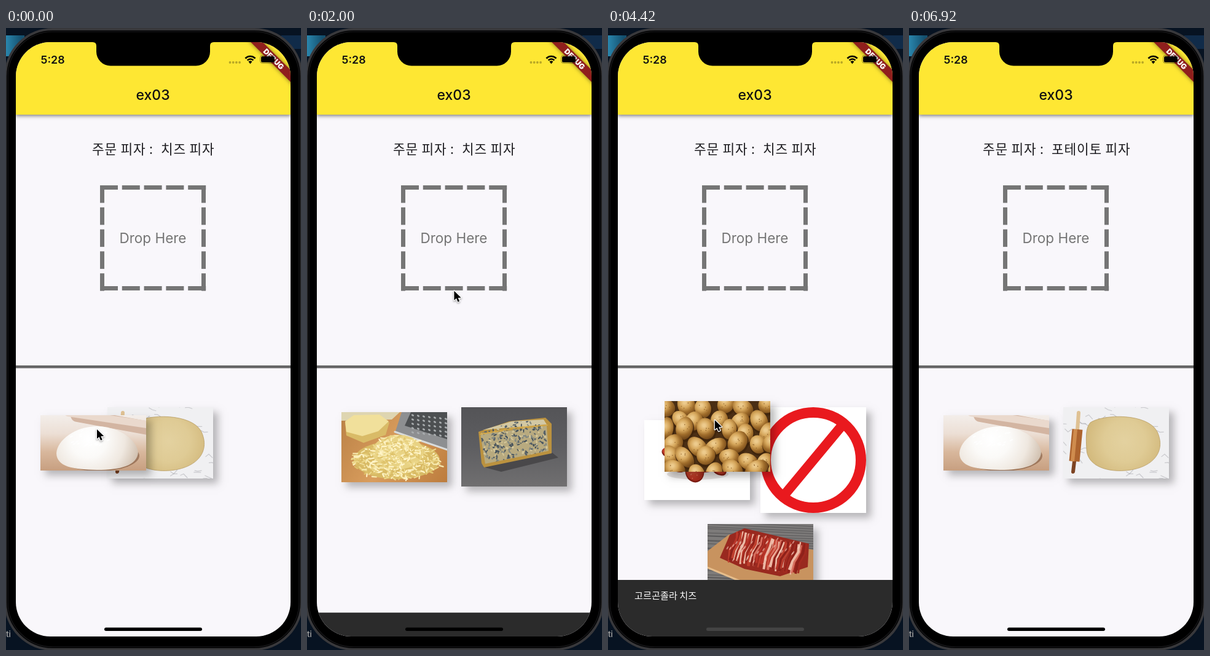
Write an HTML page with a canvas that moves like this. It is 480 px wide and 1012 px high and loops after 7010 ms.

```html
<!DOCTYPE html>
<html lang="ko">
<head>
<meta charset="utf-8">
<title>ex03</title>
<style>
html, body { margin: 0; width: 100%; height: 100%; overflow: hidden; background: #071322; }
canvas { display: block; width: 480px; height: 1012px; }
</style>
</head>
<body>
<canvas id="stage" width="480" height="1012"></canvas>
<script>
const LOOP = 7010, STEP = 1000 / 12, TAU = Math.PI * 2;
const LATIN = 'Inter, "Noto Sans", sans-serif';
const HANGUL = '"Noto Sans CJK KR", "Noto Sans CJK", "Noto Sans", sans-serif';
const ctx = document.getElementById('stage').getContext('2d');

const clamp = v => Math.max(0, Math.min(1, v));
const mix = (a, b, u) => a + (b - a) * u;
const smooth = u => u * u * (3 - 2 * u);

// cubic-bezier(.4, 0, .2, 1)
function fastOutSlowIn(p) {
  let lo = 0, hi = 1, s = 0.5;
  for (let i = 0; i < 18; i++) {
    s = (lo + hi) / 2;
    const x = 1.2 * (1 - s) ** 2 * s + 0.6 * (1 - s) * s * s + s ** 3;
    if (x < p) lo = s; else hi = s;
  }
  return 3 * (1 - s) * s * s + s ** 3;
}

function randomFrom(seed) {
  return () => {
    seed = (seed * 1664525 + 1013904223) >>> 0;
    return seed / 4294967296;
  };
}

// Drawing helpers
function ell(g, fill, x, y, rx, ry = rx, rot = 0) {
  g.fillStyle = fill;
  g.beginPath();
  g.ellipse(x, y, rx, ry, rot, 0, TAU);
  g.fill();
}
function trace(g, pts) {
  g.beginPath();
  for (let i = 0; i < pts.length; i += 2) g.lineTo(pts[i], pts[i + 1]);
}
function poly(g, fill, ...pts) {
  trace(g, pts);
  g.fillStyle = fill;
  g.fill();
}
function line(g, color, width, ...pts) {
  trace(g, pts);
  g.strokeStyle = color;
  g.lineWidth = width;
  g.stroke();
}
function gradient(g, x0, y0, x1, y1, ...colors) {
  const fill = g.createLinearGradient(x0, y0, x1, y1);
  colors.forEach((c, i) => fill.addColorStop(i / (colors.length - 1), c));
  return fill;
}
function glow(g, x, y, r, ...colors) {
  const fill = g.createRadialGradient(x, y, 2, x, y, r);
  colors.forEach((c, i) => fill.addColorStop(i / (colors.length - 1), c));
  return fill;
}
function scatter(rnd, n, x, y, rx, ry, put) {
  for (let i = 0; i < n; i++) {
    const a = rnd() * TAU, r = Math.sqrt(rnd());
    put(x + Math.cos(a) * r * rx, y + Math.sin(a) * r * ry, i);
  }
}
function picture(h, background, seed, paint) {
  const canvas = document.createElement('canvas');
  canvas.width = 172;
  canvas.height = h;
  const g = canvas.getContext('2d');
  g.fillStyle = background;
  g.fillRect(0, 0, 172, h);
  g.lineCap = 'round';
  paint(g, randomFrom(seed));
  return canvas;
}

// Ingredients
const dough = picture(90, '#eee', 3, (g, rnd) => {
  g.fillStyle = gradient(g, 0, 0, 0, 90, '#f3eeea', '#ecdfd5', '#d8b79c', '#c79f80');
  g.fillRect(0, 0, 172, 90);
  line(g, '#d3b5a2', 22, 60, 0, 180, 22);
  line(g, '#ead9cd', 12, 45, -4, 180, 16);
  ell(g, 'rgba(110,70,45,.5)', 95, 66, 66, 25);
  g.beginPath();
  g.moveTo(26, 62);
  g.bezierCurveTo(27, 40, 58, 17, 95, 18);
  g.bezierCurveTo(130, 20, 156, 40, 159, 60);
  g.bezierCurveTo(158, 82, 130, 89, 92, 89);
  g.bezierCurveTo(52, 88, 27, 84, 26, 62);
  g.fillStyle = glow(g, 78, 38, 88, '#fff', '#fbfaf8', '#efe8e0', '#cdbba9');
  g.fill();
  scatter(rnd, 25, 80, 38, 36, 14, (x, y) => ell(g, 'rgba(255,255,255,.7)', x, y, 3, 1.2, -0.4));
});

const flatDough = picture(116, '#f0f0f2', 8, (g, rnd) => {
  scatter(rnd, 60, 86, 58, 110, 75, (x, y) => {
    line(g, 'rgba(120,120,130,.32)', 1.2, x, y, x + 5, y - 5 + rnd() * 10, x + 11, y - 4 + rnd() * 9);
  });
  line(g, '#dfc193', 6, 25, 9, 23, 37);
  line(g, '#7d4322', 6, 18, 88, 16, 105);
  g.lineCap = 'butt';
  line(g, '#ad642f', 17, 23, 36, 18, 88);
  line(g, '#cf8c4e', 6, 20, 36, 15, 88);
  g.beginPath();
  g.moveTo(44, 25);
  g.bezierCurveTo(65, 11, 137, 9, 153, 40);
  g.bezierCurveTo(168, 73, 145, 99, 102, 103);
  g.bezierCurveTo(63, 106, 39, 91, 38, 69);
  g.bezierCurveTo(37, 50, 36, 34, 44, 25);
  g.fillStyle = glow(g, 100, 55, 66, '#e3d19f', '#dfcb95', '#d2b87b');
  g.strokeStyle = '#b89c63';
  g.lineWidth = 0.8;
  g.fill();
  g.stroke();
});

const tomato = picture(112, '#a9a8a8', 5, (g, rnd) => {
  g.fillStyle = gradient(g, 90, 0, 172, 112, '#e4e2e1', '#cfcdcc', '#8b8a8a');
  g.fillRect(0, 0, 172, 112);
  ell(g, '#3c302e', 78, 54, 92, 66);
  ell(g, '#c9c3c1', 78, 46, 92, 65);
  ell(g, '#54231c', 78, 42, 90, 64);
  ell(g, '#b93522', 77, 40, 84, 60);
  const tones = ['#d64e37', '#94271a', '#cb412c', '#e98870', '#a92c1c'];
  scatter(rnd, 520, 77, 40, 82, 58, (x, y, i) =>
    ell(g, tones[i % 5], x, y, 1 + rnd() * 3.5, 0.8 + rnd() * 1.6, rnd() * 3));
  ell(g, '#d8b9a8', 51, 47, 28, 19, -0.45);
  ell(g, '#67352a', 52, 47, 26, 17, -0.45);
  ell(g, '#b9432d', 56, 52, 23, 14, -0.45);
  scatter(rnd, 40, 56, 52, 20, 12, (x, y, i) => ell(g, tones[i % 5], x, y, 2, 1, 0.5));
  line(g, '#512a20', 10, 97, 40, 122, 16, 150, -2);
  line(g, '#8a5441', 3, 96, 38, 121, 14, 148, -3);
});

const cream = picture(97, '#938b87', 6, (g, rnd) => {
  for (let i = 0; i < 120; i++) {
    const x = rnd() * 172, y = rnd() * 97;
    line(g, `rgba(${rnd() < 0.5 ? '70,60,58' : '205,196,190'},.28)`, 1 + rnd() * 2, x, y, x + 40, y - 1);
  }
  line(g, '#4f4846', 2, 0, 37, 172, 36);
  line(g, '#4f4846', 2, 0, 72, 172, 71);
  poly(g, '#e3d8c8', 46, 0, 130, 0, 128, 97, 53, 97);
  for (let i = 0; i < 9; i++) {
    ell(g, i % 2 ? '#d9a82e' : '#b8382a', 52 + i * 9, 4 + i % 3 * 3, 3);
    ell(g, i % 2 ? '#b8382a' : '#d9a82e', 52 + i * 9, 91 - i % 2 * 4, 4);
  }
  line(g, '#5a2b20', 6, 118, 17, 135, 1);
  ell(g, '#5e2418', 87, 48, 49, 47);
  ell(g, '#a4563a', 87, 47, 46, 45);
  ell(g, '#74301f', 87, 48, 42, 42);
  ell(g, glow(g, 80, 60, 55, '#e2d8b9', '#d6caa8', '#b3a37f'), 87, 50, 40, 39);
  line(g, '#bda670', 7, 99, 56, 91, 94);
  line(g, '#e0d0a0', 3, 98, 56, 90, 94);
  poly(g, '#ece2c4', 87, 38, 111, 41, 104, 60, 92, 60);
});

const mozzarella = picture(114, '#cf9654', 9, (g, rnd) => {
  g.fillStyle = gradient(g, 0, 0, 172, 114, '#b98045', '#d99d5d', '#bc7c3d');
  g.fillRect(0, 0, 172, 114);
  poly(g, '#ded5b1', 0, 0, 95, 0, 82, 12, 0, 14);
  poly(g, '#d9bb67', 6, 17, 20, 6, 62, 5, 78, 17, 72, 37, 36, 50, 8, 38);
  poly(g, '#f1e09b', 6, 15, 20, 5, 62, 4, 77, 15, 60, 31, 34, 39, 8, 32);
  poly(g, '#8d8f91', 98, 0, 172, 0, 172, 62, 87, 34);
  poly(g, '#4d5052', 113, 0, 172, 0, 172, 44, 103, 22);
  for (let i = 0; i < 35; i++) {
    ell(g, '#a9adaf', 116 + i % 7 * 9, 5 + Math.floor(i / 7) * 7 + i % 7, 2.3, 1.4, 0.5);
  }
  line(g, '#d9dcdc', 3, 87, 32, 172, 61);
  ell(g, '#d8ba65', 90, 78, 70, 31);
  ell(g, '#e8d283', 92, 65, 42, 28);
  const tones = ['#f7eab0', '#ecd78a', '#fff4c8', '#dfc36c'];
  const strand = (x, y, i) => {
    const a = rnd() * TAU;
    line(g, tones[i % 4], 2.2, x, y, x + Math.cos(a) * 7, y + Math.sin(a) * 4);
  };
  scatter(rnd, 330, 90, 80, 72, 29, strand);
  scatter(rnd, 130, 92, 60, 38, 23, strand);
});

const gorgonzola = picture(129, '#5f5e61', 4, (g, rnd) => {
  g.fillStyle = gradient(g, 0, 0, 0, 129, '#545457', '#5e5e61', '#706f70');
  g.fillRect(0, 0, 172, 129);
  poly(g, '#49484a', 35, 97, 148, 74, 158, 82, 65, 105);
  poly(g, '#bb923f', 28, 40, 78, 23, 137, 17, 147, 27, 147, 75, 37, 98, 33, 91);
  poly(g, '#d3c8a4', 35, 37, 82, 23, 134, 20, 139, 28);
  poly(g, '#b8aa7f', 31, 44, 139, 30, 142, 71, 39, 92);
  g.save();
  trace(g, [31, 42, 82, 24, 134, 21, 142, 71, 39, 92]);
  g.clip();
  const tones = ['#59636a', '#858a81', '#d5c79a', '#46535d'];
  scatter(rnd, 300, 86, 57, 62, 38, (x, y, i) =>
    ell(g, tones[i % 4], x, y, 1 + rnd() * 2.4, 0.8 + rnd(), rnd() * 3));
  g.restore();
  line(g, '#d3a84a', 2, 31, 44, 86, 34, 140, 29);
});

const pepperoni = picture(130, '#fff', 12, (g, rnd) => {
  ell(g, 'rgba(90,60,50,.15)', 87, 88, 50, 9);
  ell(g, '#a12a1a', 88, 62, 46, 24);
  const slices = [58, 43, 80, 35, 101, 42, 122, 50, 44, 53, 68, 53, 90, 54, 111, 61,
    127, 58, 55, 74, 75, 67, 101, 73, 121, 78, 82, 83];
  for (let i = 0; i < slices.length; i += 2) {
    const [x, y] = [slices[i], slices[i + 1]];
    const front = i > 24;
    const rx = front ? 15 : 14 + i % 3, ry = front ? 17 : 9, rot = (i % 5 - 2) * 0.3;
    ell(g, '#7f1c12', x, y + 1.5, rx, ry, rot);
    ell(g, glow(g, x - 3, y - 2, 17, '#d9573c', '#c8402a', '#a82c1c'), x, y, rx - 1, ry - 1, rot);
    scatter(rnd, 9, x, y, rx - 4, ry - 3, (u, v) => ell(g, '#e0745a', u, v, 0.9));
  }
});

const nothing = picture(172, '#fff', 1, g => {
  g.strokeStyle = '#e9191e';
  g.lineWidth = 17;
  g.beginPath();
  g.arc(86, 86, 77.5, 0, TAU);
  g.stroke();
  line(g, '#e9191e', 16, 37, 145, 135, 27);
});

const potato = picture(115, '#4a2e14', 7, (g, rnd) => {
  for (let i = 0; i < 36; i++) {
    const x = (i % 6) * 32 + (Math.floor(i / 6) % 2) * 17 - 4 + rnd() * 14;
    const y = Math.floor(i / 6) * 22 + rnd() * 12;
    const rx = 15 + rnd() * 5, ry = 12 + rnd() * 3, rot = rnd() * 3;
    ell(g, 'rgba(60,34,10,.75)', x + 1, y + 3, rx + 1, ry + 1, rot);
    ell(g, glow(g, x - 3, y - 5, 22, '#edcb8d', '#d6a75c', '#a06d2b', '#74491a'), x, y, rx, ry, rot);
    scatter(rnd, 4, x, y, 9, 8, (u, v) => ell(g, '#94672f', u, v, 0.8));
  }
});

const bacon = picture(97, '#7d7b7a', 11, (g, rnd) => {
  for (let y = -5; y < 97; y += 4) line(g, 'rgba(50,50,53,.35)', 1.5, 0, y + rnd() * 5, 172, y + 9);
  poly(g, '#c8935f', 0, 44, 35, 17, 172, 42, 172, 97, 60, 97, 0, 72);
  line(g, '#e6bd8b', 3, 0, 71, 58, 95, 172, 96);
  poly(g, '#99291f', 20, 55, 36, 18, 60, 7, 165, 32, 163, 70, 118, 85, 60, 73);
  g.lineCap = 'butt';
  const tones = ['#b93529', '#8e211a', '#d8705f', '#c0402f', '#edb8a4', '#a22a20'];
  for (let i = 0; i < 48; i++) {
    const x = 48 + i * 2.4, y = 10 + i * 0.45;
    line(g, tones[Math.floor(rnd() * 6)], 2 + rnd() * 3,
      x, y + rnd() * 6, x - 5 + rnd() * 4, y + 17, x - 10 - rnd() * 3, y + 32,
      x - 17 + rnd() * 4, y + 44 + rnd() * 9);
  }
  scatter(rnd, 45, 92, 44, 62, 24, (x, y) => ell(g, 'rgba(245,205,190,.6)', x, y, 3, 1, -1));
});

const pages = [
  { gap: 23, items: [dough, flatDough] },
  { gap: 23, items: [tomato, cream] },
  { gap: 23, items: [mozzarella, gorgonzola] },
  { gap: 17, items: [pepperoni, nothing, potato, bacon] }
];

// Schedule, in ms
const drags = [
  { start: 0, end: 540, page: 0, item: 0, dx: 92, dy: 23 },
  { start: 1060, end: 1640, page: 1, item: 0, dx: 134, dy: 8 },
  { start: 2450, end: 2940, page: 2, item: 1, dx: 35, dy: 11 },
  { start: 4050, end: 4980, page: 3, item: 2, dx: 82, dy: 31 }
];
const snacks = [
  { text: '오리지널 도우', enter: 560, leave: 1830 },
  { text: '토마토 소스', enter: 2075, leave: 3305 },
  { text: '고르곤졸라 치즈', enter: 3558, leave: 4883 }
];
const cursorPath = [
  [0, 148, 653], [500, 232, 320], [600, 232, 320], [1060, 190, 625], [1600, 210, 301],
  [1720, 210, 301], [2380, 286, 628], [2450, 286, 628], [2900, 251, 316], [3060, 251, 316],
  [3750, 141, 806], [3950, 141, 838], [4050, 141, 838], [4930, 227, 314], [5180, 227, 314],
  [5950, 343, 577]
];

function cursorAt(t) {
  const i = cursorPath.findIndex(k => k[0] > t);
  if (i < 0) return cursorPath[cursorPath.length - 1].slice(1);
  const [t0, x0, y0] = cursorPath[i - 1], [t1, x1, y1] = cursorPath[i];
  const u = smooth((t - t0) / (t1 - t0));
  return [mix(x0, x1, u), mix(y0, y1, u)];
}

function text(str, x, y, size, { color = '#1c1b1f', weight = 400, font = HANGUL, align = 'left', spacing = 0 } = {}) {
  ctx.font = `${weight} ${size}px ${font}`;
  ctx.letterSpacing = spacing + 'px';
  ctx.textAlign = align;
  ctx.fillStyle = color;
  ctx.fillText(str, x, y);
}
function rect(color, x, y, w, h) {
  ctx.fillStyle = color;
  ctx.fillRect(x, y, w, h);
}
function round(color, x, y, w, h, r) {
  ctx.fillStyle = color;
  ctx.beginPath();
  ctx.roundRect(x, y, w, h, r);
  ctx.fill();
}
function withShadow(color, blur, dx, dy, draw) {
  ctx.save();
  ctx.shadowColor = color;
  ctx.shadowBlur = blur;
  ctx.shadowOffsetX = dx;
  ctx.shadowOffsetY = dy;
  draw();
  ctx.restore();
}
function card(pic, x, y) {
  withShadow('rgba(0,0,0,.27)', 12, 8, 8, () => rect('#fff', x, y, pic.width, pic.height));
  ctx.drawImage(pic, x, y);
}

function drawItems(page, held) {
  let top = 617;
  for (let i = 0; i < page.items.length; i += 2) {
    const row = page.items.slice(i, i + 2).map((pic, j) => i + j === held ? null : pic);
    const height = Math.max(...row.map(p => p ? p.height : 0));
    let x = 239.5 - (row.reduce((sum, p) => sum + (p ? 172 : 0), 0) + page.gap) / 2;
    for (const pic of row) {
      if (pic) card(pic, Math.round(x), Math.round(top + (height - pic.height) / 2));
      x += (pic ? 172 : 0) + page.gap;
    }
    top += height + 18;
  }
}

function drawDropBox() {
  for (let i = 0; i < 5; i++) {
    const p = i * 35.8;
    rect('#757575', 153 + p, 256, 29, 7);
    rect('#757575', 153 + p, 420, 29, 7);
    rect('#757575', 153, 256 + p, 7, 28.5);
    rect('#757575', 318, 256 + p, 7, 28.5);
  }
  text('Drop Here', 239, 350, 22.5, { color: '#757575', font: LATIN, align: 'center' });
}

// Returns the visible height of the bar.
function drawSnack(t) {
  const snack = snacks.find(s => t >= s.enter && t < s.leave + 250);
  if (!snack) return 0;
  const p = Math.min(clamp((t - snack.enter) / 250), 1 - clamp((t - snack.leave) / 250));
  const height = 92 * fastOutSlowIn(p), top = 990 - height;
  rect('#2b2b2b', 16, top, 447, height);
  ctx.globalAlpha = clamp((p - 0.6) / 0.4);
  text(snack.text, 43, top + 31, 15.2, { color: '#fff' });
  ctx.globalAlpha = 1;
  return height;
}

function drawDialog(t) {
  const shown = Math.min(clamp((t - 5090) / 150), 1 - clamp((t - 6560) / 150));
  if (!shown) return;
  const alpha = 1 - (1 - shown) ** 2;
  rect(`rgba(0,0,0,${0.56 * alpha})`, 16, 23, 447, 967);
  ctx.globalAlpha = alpha;
  withShadow('rgba(0,0,0,.5)', 34, 0, 11, () => round('#fff', 75, 413, 329, 202, 12));
  text('result', 103, 462, 23, { font: LATIN });
  text('피자가 제대로 만들어지지 않았습니다.', 102, 508, 16.8);
  text('확인', 330, 582, 14.7);
  ctx.globalAlpha = 1;
}

function drawBanner() {
  ctx.save();
  ctx.translate(463, 23);
  ctx.rotate(Math.PI / 4);
  withShadow('rgba(0,0,0,.5)', 7, 0, 0, () => rect('#8f1f1d', -60, 32, 120, 13.8));
  text('DEBUG', 0, 43.2, 12, { color: '#fff', weight: 900, font: LATIN, align: 'center' });
  ctx.restore();
}

function drawStatus(indicator) {
  text('5:28', 76, 58, 17.8, { color: '#111', weight: 600, font: LATIN, align: 'center' });
  for (let i = 0; i < 4; i++) ell(ctx, 'rgba(0,0,0,.28)', 364.5 + i * 5.2, 56, 1.9);
  ctx.strokeStyle = '#000';
  ctx.lineWidth = 2.7;
  for (const r of [6.5, 11]) {
    ctx.beginPath();
    ctx.arc(397.5, 57, r, -Math.PI * 0.76, -Math.PI * 0.24);
    ctx.stroke();
  }
  poly(ctx, '#000', 397.5, 58.5, 394.4, 54.5, 397.5, 53.2, 400.6, 54.5);
  ctx.strokeStyle = 'rgba(0,0,0,.4)';
  ctx.lineWidth = 1;
  ctx.beginPath();
  ctx.roundRect(413.5, 44.5, 25, 13, 4);
  ctx.stroke();
  round('#000', 415, 46, 22, 10, 2.5);
  round(indicator, 160, 975.5, 159, 5.5, 2.75);
}

function drawPhone() {
  rect('#071322', 0, 0, 480, 1012);
  rect(gradient(ctx, 0, 12, 25, 12, '#2a86ad', '#14506f'), 0, 12, 30, 34);
  rect('#102b49', 448, 12, 32, 22);
  text('ti', 0, 991, 13, { color: '#999', weight: 600, font: LATIN });
  round('#000', -1, 2, 482, 1009, 77);
  ctx.strokeStyle = '#38383b';
  ctx.lineWidth = 4;
  ctx.stroke();
  ctx.strokeStyle = '#151517';
  ctx.lineWidth = 1.5;
  ctx.beginPath();
  ctx.roundRect(3, 6, 474, 1001, 73);
  ctx.stroke();
}

function drawNotch() {
  ctx.fillStyle = '#000';
  ctx.beginPath();
  ctx.moveTo(141, 21);
  ctx.lineTo(141, 23);
  ctx.quadraticCurveTo(147, 23, 147, 29);
  ctx.arcTo(147, 61.5, 175, 61.5, 23);
  ctx.arcTo(332, 61.5, 332, 40, 23);
  ctx.lineTo(332, 29);
  ctx.quadraticCurveTo(332, 23, 338, 23);
  ctx.lineTo(338, 21);
  ctx.fill();
}

function drawCursor(x, y) {
  ctx.save();
  ctx.translate(x, y);
  ctx.scale(0.9, 0.9);
  withShadow('rgba(0,0,0,.35)', 3, 0, 1.5, () => {
    trace(ctx, [0, 0, 0, 17, 4, 13.5, 6.8, 20, 9.7, 18.7, 7, 12.5, 12.5, 12.3]);
    ctx.closePath();
    ctx.lineJoin = 'round';
    ctx.lineWidth = 2.8;
    ctx.strokeStyle = '#fff';
    ctx.stroke();
  });
  ctx.fillStyle = '#000';
  ctx.fill();
  ctx.restore();
}

function draw(t) {
  const drag = drags.find(d => t >= d.start && t < d.end);
  const next = drags.find(d => t < d.end);
  const page = pages[next ? next.page : 0];
  const [cx, cy] = cursorAt(t);

  drawPhone();
  ctx.save();
  ctx.beginPath();
  ctx.roundRect(16, 23, 447, 967, 56);
  ctx.clip();
  rect('#f9f7fb', 16, 23, 447, 967);
  withShadow('rgba(0,0,0,.5)', 6, 0, 2, () => rect('#fee733', 16, 23, 447, 118));
  text('ex03', 239, 117, 23, { color: '#111', weight: 500, font: LATIN, align: 'center' });

  const shift = next ? 0 : -20;
  text('주문 피자 :', 140 + shift, 205, 21.4, { spacing: 0.8 });
  text(next ? '치즈 피자' : '포테이토 피자', 252 + shift, 205, 21.4, { spacing: 0.8 });
  drawDropBox();
  rect('#666', 16, 549, 447, 4.5);
  drawItems(page, drag ? drag.item : -1);
  const snackHeight = drawSnack(t);
  if (drag) card(page.items[drag.item], Math.round(cx - drag.dx), Math.round(cy - drag.dy));
  drawDialog(t);
  drawBanner();
  drawStatus(snackHeight > 40 ? '#444' : '#000');
  ctx.restore();
  drawNotch();
  if (t < 6850) drawCursor(cx, cy);
}

const began = performance.now();
function tick() {
  const t = (performance.now() - began) % LOOP;
  const step = Math.min(83, Math.floor((t + 5) / STEP));
  draw(Math.round(step * STEP / 10) * 10);
  requestAnimationFrame(tick);
}
tick();
</script>
</body>
</html>
```
